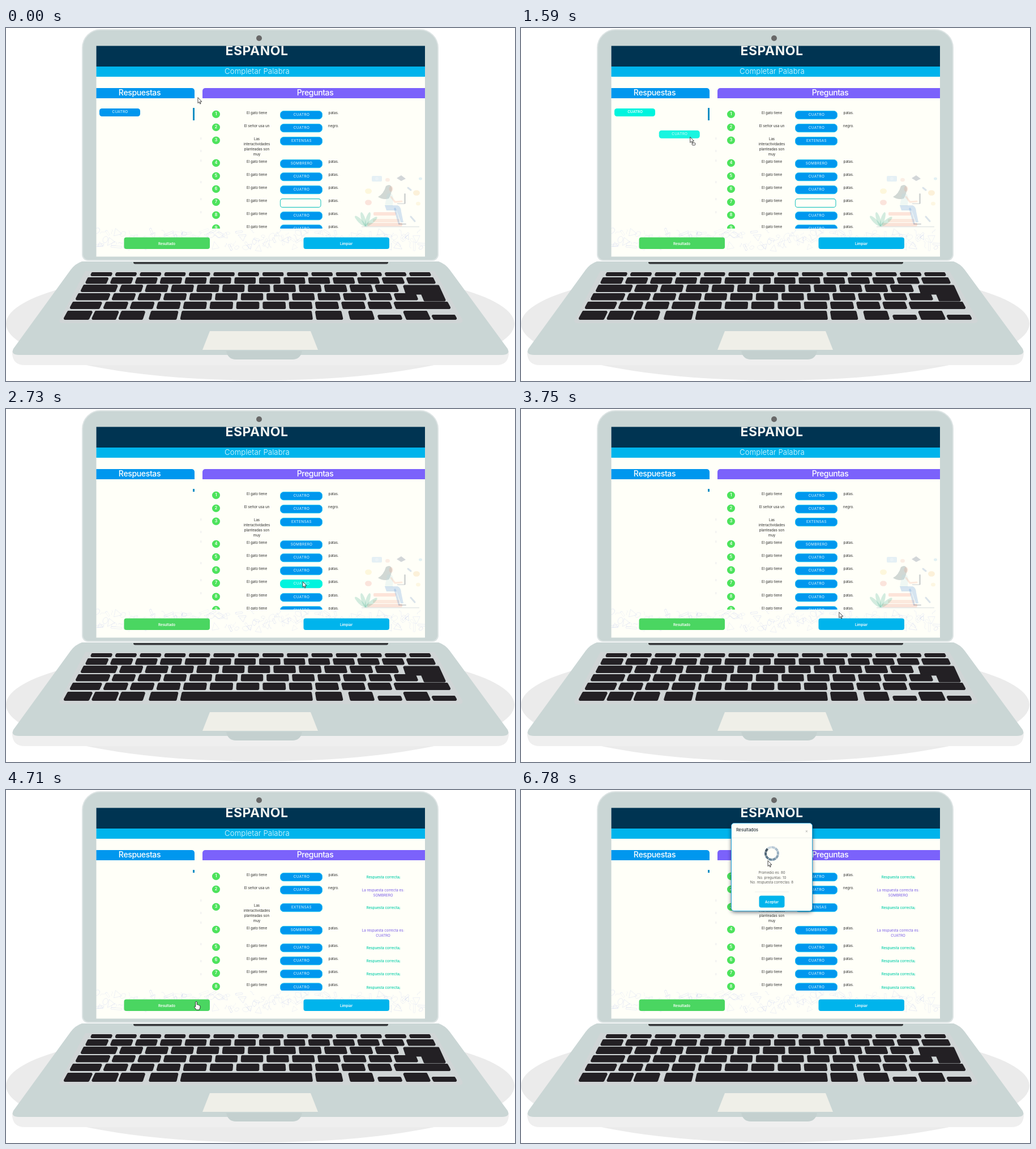
Animation, 899 px wide and 623 px high, one loop 6.84 s. Source, as an HTML page with a canvas:

```html
<!DOCTYPE html>
<html lang="es">
<head>
<meta charset="utf-8">
<style>
html, body { margin: 0; width: 100%; height: 100%; overflow: hidden; background: #fff; }
canvas { display: block; }
</style>
</head>
<body>
<canvas id="stage" width="899" height="623"></canvas>
<script>
const LOOP = 6840;
const GRAB = 1410, DROP = 2160, RESULTS = 4560, MODAL = 5520;
const BLUE = '#0097ee', CYAN = '#00b4ec', AQUA = '#00f4de', PAPER = '#fffff8', GREEN = '#4de35c', KEY = '#232024';

const stage = document.getElementById('stage').getContext('2d');
const baseCanvas = document.createElement('canvas');
baseCanvas.width = 899;
baseCanvas.height = 623;
let c = baseCanvas.getContext('2d');

function box(x, y, w, h, fill, radius = 0, stroke, line = 1) {
  c.beginPath();
  c.roundRect(x, y, w, h, radius);
  if (fill) { c.fillStyle = fill; c.fill(); }
  if (stroke) { c.strokeStyle = stroke; c.lineWidth = line; c.stroke(); }
}
function oval(x, y, rx, ry, fill) {
  c.beginPath();
  c.ellipse(x, y, rx, ry, 0, 0, 7);
  c.fillStyle = fill;
  c.fill();
}
function shape(d, fill, stroke, line = 1) {
  const path = new Path2D(d);
  c.lineJoin = c.lineCap = 'round';
  if (fill) { c.fillStyle = fill; c.fill(path); }
  if (stroke) { c.strokeStyle = stroke; c.lineWidth = line; c.stroke(path); }
}
function text(s, x, y, size, weight, color, spacing = 0) {
  c.font = `${weight} ${size}px Inter, sans-serif`;
  c.letterSpacing = spacing + 'px';
  c.textAlign = 'center';
  c.textBaseline = 'middle';
  c.fillStyle = color;
  c.fillText(s, x, y);
}
const small = (s, x, y, color = '#2a2a2a', weight = 400) => text(s, x, y, 6.2, weight, color);

// Laptop: x is measured at the middle of the key, sides lean away from the centre
function key(x, y, w, h) {
  const lean = (px, side) => px + (px - 449) * 0.0008 * (h - 5) * side;
  const l = x + 2.5, r = x + w - 2.5, top = y + 2.5, bottom = y + h - 2.5;
  shape(`M${lean(l, -1)} ${top}H${lean(r, -1)}L${lean(r, 1)} ${bottom}H${lean(l, 1)}Z`, KEY, KEY, 5);
}
function keyRow(y, h, x0, x1, first, count, last = 0) {
  const gap = 6, unit = (x1 - x0 + gap) / (first + count + last);
  let x = x0;
  for (const n of [first, ...Array(count).fill(1), last]) {
    if (n) key(x, y, n * unit - gap, h);
    x += n * unit;
  }
}
function drawLaptop() {
  oval(449, 522, 449, 100, '#ebebeb');
  shape('M11 570H888V576Q886 595 866 595H33Q13 595 11 576Z', '#efefef');
  shape('M134 412H764Q776 416 784 427L886 566Q891 577 876 577H23Q8 577 13 566L114 427Q122 416 134 412Z', '#cad6d5');
  shape('M389 570H523Q520 585 506 585H406Q392 585 389 570Z', '#c4d0cf');
  shape('M140 429H757L806 514Q808 521 800 521H100Q92 521 95 514Z', '#d0d5d6');

  keyRow(431, 7, 150, 750, 1, 13);
  keyRow(440, 11.5, 142, 757, 1, 12, 1.25);
  keyRow(453, 13, 134, 692, 1.5, 11);
  keyRow(468, 12.5, 125, 726, 1.4, 12);
  keyRow(483, 13, 115, 783, 1.26, 11, 2.2);
  shape('M704 456H763L774 480H740L735 468H708Z', KEY, KEY, 5);
  for (const [x, w] of [[105, 45], [154, 43], [201, 43], [254, 49], [309, 232], [547, 47], [606, 43], [704, 43]]) key(x, 499, w, 16);
  for (const x of [657, 753]) key(x, 506, 42, 9);

  shape('M360 535H538L551 568H347Z', '#efefe8');
  box(135, 3, 628, 407, '#cad6d5', [32, 32, 10, 10], '#dde4e4', 2);
  box(225, 413, 450, 3.5, '#36383a', [0, 0, 3, 3]);
  oval(447, 18, 5, 5, '#686868');
}

// Web page
function seeded(seed) {
  return () => (seed = (seed * 16807) % 2147483647) / 2147483647;
}
function drawDoodles() {
  const rnd = seeded(41);
  for (let i = 0; i < 150; i++) {
    c.save();
    c.translate(160 + i * 3.87, 358 + rnd() * 30);
    c.rotate(rnd() * 6.3);
    c.strokeStyle = `rgba(120,140,225,${0.08 + rnd() * 0.12})`;
    c.lineWidth = 0.8;
    c.beginPath();
    const kind = i % 4, s = 3 + rnd() * 4;
    if (kind === 0) c.ellipse(0, 0, s, s * 0.7, 0, 0, 6.3);
    else if (kind === 1) c.roundRect(-s * 1.4, -1.6, s * 2.8, 3.2, 1);
    else if (kind === 2) { c.moveTo(-s, s); c.lineTo(0, -s); c.lineTo(s, s); c.closePath(); }
    else { c.moveTo(-s, 0); c.bezierCurveTo(-s / 2, -s, s / 2, s, s, 0); }
    c.stroke();
    c.restore();
  }
}
function drawPage() {
  c.save();
  c.beginPath();
  c.rect(159.5, 31.5, 580.5, 372);
  c.clip();
  box(159, 31, 582, 373, PAPER);
  box(159, 31, 582, 37, '#003452');
  box(159, 68, 582, 18, CYAN);
  text('ESPAÑOL', 443, 41.3, 23, 700, '#f3f5f2', 0.5);
  text('Completar Palabra', 443.5, 77, 13.2, 300, '#eafaff', 0.1);
  box(159, 106, 174, 18, BLUE, [0, 5, 0, 0]);
  box(347, 106, 394, 18, '#7b62fb', [5, 0, 0, 0]);
  text('Respuestas', 236, 114.5, 14, 500, '#fff', -0.35);
  text('Preguntas', 546, 114.5, 14, 500, '#fff', -0.4);
  for (const y of [193, 215, 232, 270, 300, 323]) box(343, y, 2.5, 4, '#f3f3f1');
  drawDoodles();
  box(208.5, 369.5, 151.5, 20.5, '#4ad661', 4);
  box(525.5, 369.5, 151.5, 20.5, CYAN, 4);
  small('Resultado', 284, 381, '#fff', 600);
  small('Limpiar', 601, 381, '#fff', 600);
  c.restore();
}
function drawStudent() {
  c.save();
  c.globalAlpha = 0.23;
  box(628, 350, 102, 1.5, '#8899aa');
  for (const [x, y, w, color] of [[649, 325, 40, '#f58b72'], [652, 331, 42, '#fff0e0'], [648, 337, 47, '#f3a184'], [638, 344, 62, '#e98467']])
    box(x, y, w, 6, color, 2);
  for (const a of [-0.8, -0.3, 0.3, 0.9]) {
    c.save();
    c.translate(635, 350);
    c.rotate(a);
    oval(0, -13, 3.5, 13, '#3fae8e');
    c.restore();
  }
  shape('M671 279Q680 273 682 284Q680 295 676 301Q666 304 657 298Q667 293 671 279Z', '#38565e');
  oval(680, 284, 3.5, 5, '#f2a58c');
  shape('M673 293Q682 289 684 299L683 314H669Z', '#b8dbe4');
  shape('M680 298L687 307L699 306', null, '#f2a58c', 3);
  shape('M669 313H692Q698 316 698 324L702 343H697L690 322H672Z', '#4a8bd2');
  shape('M687 319L694 344', null, '#4a8bd2', 3.5);
  shape('M694 346H706', null, '#34445d', 2);
  box(703, 292, 3, 18, '#465364', 1);
  box(691, 309, 14, 2, '#8a94a0');
  box(646, 261, 18, 10, '#8fbfec', 2);
  oval(655, 266, 3, 3, '#fff');
  shape('M690 265L698 260L706 266L698 270Z', '#3c4e72');
  for (const [x, y, r, color] of [[640, 308, 6, '#ee8c80'], [640, 288, 6, '#f5dd83'], [725, 291, 6, '#f3c173'],
    [674, 268, 4, '#eeb4a9'], [732, 266, 3, '#83bfe6'], [728, 310, 4, '#f7dc9a']]) oval(x, y, r, r * 0.8, color);
  shape('M715 333L722 341M710 282L715 286', null, '#6287b8', 3);
  c.restore();
}

function chip(label, y, hot) {
  box(484.5, y - 7, 74, 14.3, hot ? AQUA : BLUE, 6, hot ? AQUA : '#1cc4f2');
  text(label, 522, y, 6.4, 400, '#e6f8ff', 0.35);
}
function answer(x, y, hot, weight = 400) {
  box(x, y, 72, 14, hot ? AQUA : BLUE, 4.5);
  text('CUATRO', x + 36.5, y + 6.5, 6.4, weight, '#eefcff', weight > 400 ? 0 : 0.3);
}

const before = [152, 175, 198, 238, 261, 284, 307, 330, 353];
const after = [152, 175, 206, 246, 277, 300, 323, 346.5, 370];
const words = { 2: 'EXTENSAS', 3: 'SOMBRERO' };
const fixes = { 1: 'SOMBRERO', 3: 'CUATRO' };

function drawQuestions(t) {
  const graded = t >= RESULTS, filled = t >= DROP;
  c.save();
  c.beginPath();
  c.rect(347, 125, 393, 229);
  c.clip();
  (graded ? after : before).forEach((y, i) => {
    if (filled && !graded && i > 6) y++;
    oval(371, y + 0.3, 7, 6.7, GREEN);
    text(i + 1, 371, y + 0.3, 7, 600, '#fff');
    if (i === 2) ['Las', 'interactividades', 'planteadas son', 'muy'].forEach((s, n) => small(s, 443, y - 1.7 + n * 8.9));
    else {
      small(i === 1 ? 'El señor usa un' : 'El gato tiene', 443, y - 2);
      small(i === 1 ? 'negro.' : 'patas.', 578.5, y - 2);
    }
    if (i === 6 && !filled) box(484.5, y - 5.5, 71.5, 15, PAPER, 4, '#45cfc9', 1.3);
    else chip(words[i] || 'CUATRO', y + 1.4, i === 6 && t < 3240);
    if (!graded) return;
    if (fixes[i]) {
      small('La respuesta correcta es:', 666, y + 2.5, '#7558e6');
      small(fixes[i], 666, y + 11, '#7558e6');
    } else small('Respuesta correcta¡', 666.5, y + 2.3, '#00cda7', 500);
  });
  c.restore();
}

function drawModal(t) {
  const k = Math.min(1, (t - MODAL) / 240), ease = 1 - (1 - k) ** 2;
  c.save();
  c.globalAlpha = ease;
  c.translate(0, -26 * (1 - ease));
  c.shadowColor = 'rgba(0,20,40,.65)';
  c.shadowBlur = 7;
  c.shadowOffsetY = 2;
  box(371.5, 58.5, 143, 155, PAPER, 5);
  c.shadowColor = 'transparent';
  box(371.5, 58.5, 143, 155, null, 5, '#28a9df');
  text('Resultados', 399.5, 71, 7.4, 500, '#25323d');
  text('×', 504.5, 73, 8, 400, '#aaa');
  box(372, 84, 142, 0.7, '#e6e8e8');
  const turn = (t - 6150) / 630 * 2 * Math.PI;
  for (let i = 0; i < 10; i++) {
    const a = turn + 3.4 - i * Math.PI / 5;
    c.beginPath();
    c.arc(443, 112, 11, a, a + 0.57);
    c.strokeStyle = `hsl(205 ${18 + i}% ${34 + i * 5.6}%)`;
    c.lineWidth = 4;
    c.lineCap = 'butt';
    c.stroke();
  }
  small('Promedio es: 80', 443, 146, '#333', 300);
  small('No. preguntas: 10', 443, 155, '#333', 300);
  small('No. respuesta correctas: 8', 443, 163.5, '#333', 300);
  box(413, 179.5, 60, 0.7, '#e8eaea');
  box(420.5, 186.5, 45, 21, CYAN, 4);
  small('Aceptar', 443, 198, '#fff', 600);
  c.restore();
}

// Pointer: time, x, y
const track = [
  [0, 339, 123], [690, 258, 168], [900, 231, 164], [1260, 220, 154], [GRAB, 220, 154],
  [2010, 523, 303], [2090, 524, 305], [3100, 524, 305], [3500, 569, 350], [3750, 562, 359],
  [4440, 338, 375], [4680, 336, 374], [5520, 336, 374], [6150, 455, 322], [LOOP, 435, 114]
];
function pointer(t) {
  const i = track.findIndex(p => p[0] > t);
  const [t0, x0, y0] = track[i - 1], [t1, x1, y1] = track[i];
  const u = (t - t0) / (t1 - t0), e = (u + u * u * (3 - 2 * u)) / 2;
  return [x0 + (x1 - x0) * e, y0 + (y1 - y0) * e];
}
function drawPointer(x, y, dragging) {
  const onButton = x > 208 && x < 360 && y > 369 && y < 390;
  c.save();
  c.translate(x, y);
  if (onButton) shape('M-1.3 8V0Q0-1.8 1.3 0V5Q3 4 3.6 5.5Q5 5 5.5 6.3Q7 6 7 8V10L5.5 14H.2L-3.4 9Q-3.3 7-1.3 8Z', '#fff', '#222', 0.9);
  else shape('M0 0V9.5L2.2 7.5L3.8 11L5.2 10.3L3.7 7H6.5Z', '#fff', '#333', 0.9);
  if (dragging) box(3.5, 10, 5.5, 4, '#fff', 1, '#333', 0.9);
  c.restore();
}

drawLaptop();
drawPage();

function draw(now) {
  const t = now % LOOP;
  c = stage;
  c.clearRect(0, 0, 899, 623);
  c.drawImage(baseCanvas, 0, 0);
  if (t < RESULTS) drawStudent();
  const [x, y] = pointer(t);
  const dragging = t >= GRAB && t < DROP;
  box(330, 141, 3, t < DROP ? 22 : 5, '#0b8fc4');
  if (t < DROP) answer(165, 142, t >= 1170, dragging ? 600 : 400);
  drawQuestions(t);
  if (dragging) {
    c.globalAlpha = 0.9;
    answer(x - 55, y - 12, true);
    c.globalAlpha = 1;
  }
  if (t >= MODAL) drawModal(t);
  drawPointer(x, y, dragging);
  requestAnimationFrame(() => draw(performance.now()));
}
draw(performance.now());
</script>
</body>
</html>
```
